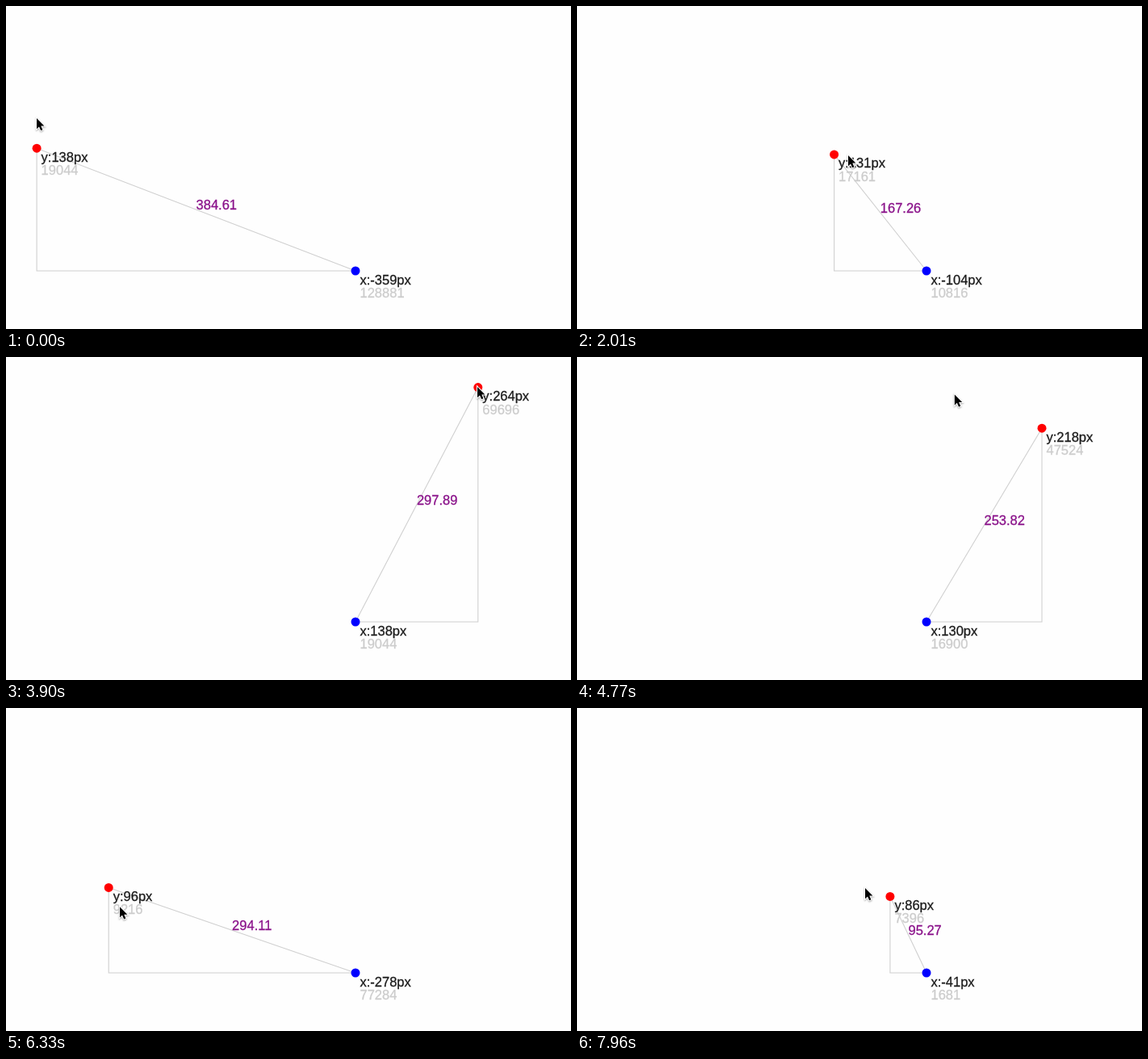
These frames come from a looping animation (700x400 px, 8000 ms). An HTML page with a canvas:

```html
<!DOCTYPE html>
<html>
<head>
<meta charset="utf-8">
<style>
html, body { margin: 0; width: 100%; height: 100%; overflow: hidden; background: #fefefe; }
canvas { display: block; }
</style>
</head>
<body>
<canvas id="stage" width="700" height="400"></canvas>
<script>
const ctx = document.getElementById('stage').getContext('2d');
const LOOP = 8000, STEP = 57.1; // ms; the picture is redrawn once per step
const UNIT = 1.1;               // stage pixels per shown pixel
const LAG = 2.8;                // steps the dot trails behind the pointer
const base = { x: 433, y: 328 };

// Turning points: step, dot x, dot y, pointer x, pointer y
const keys = [
  [0, 38, 176, 38, 140],
  [14, 26, 36.5, 23, 33],
  [20, 50, 21, 80, 21],
  [31, 318.6, 184, 336, 186],
  [35, 318.6, 184, 336, 186],
  [49, 479, 76, 510, 67],
  [68, 584.8, 37.6, 584, 38],
  [81, 645, 125, 560, 61],
  [89, 310, 42, 182, 29],
  [96, 144.8, 45.3, 132, 48],
  [111, 133, 230, 150, 246],
  [122, 408, 92, 425, 86],
  [125, 412, 90.4, 380, 143],
  [139, 388, 233.4, 357, 224]
];

// The dot eases after the pointer: its speed is the gap between them over LAG.
function follow(t, axis) {
  const i = Math.max(1, keys.findIndex(k => k[0] >= t));
  const a = keys[i - 1], b = keys[i], span = b[0] - a[0], s = (t - a[0]) / span;
  const p = a[axis], q = b[axis], d = q - p;
  const u = (a[axis + 2] - p) / LAG, v = (b[axis + 2] - q) / LAG;
  const pos = p + d * s * s * (3 - 2 * s) + span * s * (1 - s) * (u * (1 - s) - v * s);
  const speed = 6 * d / span * s * (1 - s) + u * (1 - s) * (1 - 3 * s) + v * s * (3 * s - 2);
  return { dot: pos, pointer: pos + speed * LAG };
}

function dot(x, y, color) {
  ctx.fillStyle = color;
  ctx.beginPath();
  ctx.arc(x, y, 5.5, 0, 2 * Math.PI);
  ctx.fill();
}

function text(str, x, y, color) {
  ctx.fillStyle = ctx.strokeStyle = color;
  ctx.lineWidth = 0.3;
  ctx.fillText(str, x, y);
  ctx.strokeText(str, x, y);
}

function label(name, value, x, y) {
  text(`${name}:${value}px`, x + 5.5, y + 16.5, '#1c1c1c');
  text(value * value, x + 5.5, y + 33, '#ccc');
}

const arrow = new Path2D('M0 0V13.2L3 10.4L5.2 15.2L7.4 14.2L5.3 9.6H9.4Z');

function pointer(x, y) {
  ctx.save();
  ctx.translate(x, y - 1);
  ctx.strokeStyle = '#fff';
  ctx.lineWidth = 2;
  ctx.shadowColor = 'rgba(0,0,0,.35)';
  ctx.shadowBlur = 2;
  ctx.shadowOffsetY = 1;
  ctx.stroke(arrow);
  ctx.shadowColor = 'transparent';
  ctx.fillStyle = '#000';
  ctx.fill(arrow);
  ctx.restore();
}

function draw(time) {
  const last = keys[keys.length - 1][0];
  const t = Math.min(last, Math.floor(time / STEP));
  const fx = follow(t, 1), fy = follow(t, 2);
  const dx = Math.round((fx.dot - base.x) / UNIT);
  const dy = Math.round((base.y - fy.dot) / UNIT);
  const x = base.x + dx * UNIT, y = base.y - dy * UNIT;

  ctx.fillStyle = '#fefefe';
  ctx.fillRect(0, 0, 700, 400);
  ctx.font = '16.5px "Liberation Sans", Arial, sans-serif';

  ctx.strokeStyle = '#d0d0d0';
  ctx.lineWidth = 1.1;
  ctx.beginPath();
  ctx.moveTo(base.x, base.y);
  ctx.lineTo(x, y);
  ctx.lineTo(x, base.y);
  ctx.closePath();
  ctx.stroke();

  dot(base.x, base.y, '#00f');
  dot(x, y, '#f00');
  label('x', dx, base.x, base.y);
  label('y', dy, x, y);
  text(Math.hypot(dx, dy).toFixed(2), (x + base.x) / 2, (y + base.y) / 2, '#8a128a');
  pointer(fx.pointer, fy.pointer);
}

const start = performance.now();
function tick(now) {
  draw(Math.max(0, now - start) % LOOP);
  requestAnimationFrame(tick);
}
draw(0);
requestAnimationFrame(tick);
</script>
</body>
</html>
```
